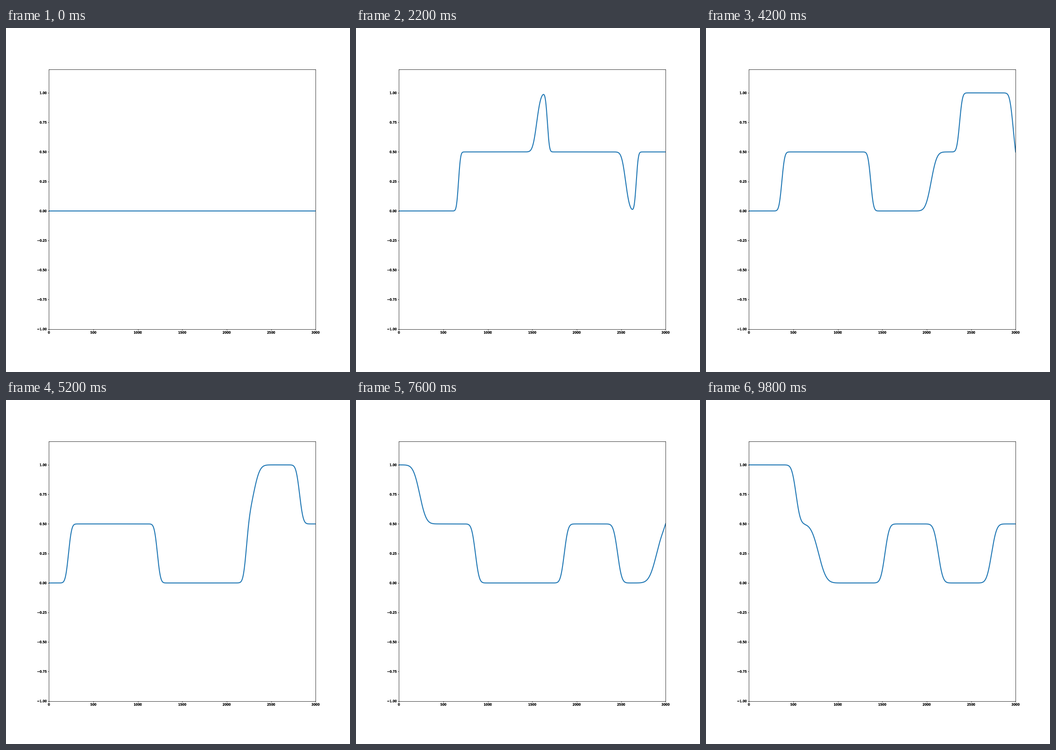
Recreate the animation shown at these times as a matplotlib script. Size 748x748 px, loop 10000 ms.

```python
import math

import matplotlib.pyplot as plt
import numpy as np
from matplotlib.animation import FuncAnimation
from matplotlib.patheffects import withStroke

SIZE = 748
FRAMES = 50
INTERVAL = 200
LENGTH = 3000

# Two travelling waves: cells per frame and spread (variance) per frame
LEFT_SPEED, LEFT_SPREAD = 30, 30
RIGHT_SPEED, RIGHT_SPREAD = 50, 120
BOX = (1000, 2000)

plt.rcParams["path.simplify_threshold"] = 0.077

erf = np.vectorize(math.erf)
x = np.arange(LENGTH + 1)


def edge(center, var):
    """Smooth rise from 0 to 0.5 around center."""
    return 0.25 * (1 + erf((x - center) / math.sqrt(2 * var)))


def right_edge(start, k, born=0, var=0):
    age = k - born
    return edge(start + RIGHT_SPEED * age, var + RIGHT_SPREAD * max(age, 0) + 1)


def left_edge(start, k, born=0, var=0):
    age = k - born
    return edge(start - LEFT_SPEED * age, var + LEFT_SPREAD * max(age, 0) + 1)


def wave(k):
    if k == 0:
        return np.zeros(len(x))
    a, b = BOX
    u = left_edge(a, k) - left_edge(b, k) + left_edge(LENGTH, k)
    u += right_edge(a, k) - right_edge(b, k)

    # Fixed value at the right end: reflection with flipped sign
    for start, sign in ((b, -1), (a, 1)):
        hit = (LENGTH - start) / RIGHT_SPEED
        var = RIGHT_SPREAD * hit * (LEFT_SPEED / RIGHT_SPEED) ** 2
        u += sign * left_edge(LENGTH, k, hit, var)

    # Free left end: reflection with the same sign
    hit = a / LEFT_SPEED
    var = LEFT_SPREAD * hit * (RIGHT_SPEED / LEFT_SPEED) ** 2
    return u + 0.5 - right_edge(0, k, hit, var)


fig = plt.figure(figsize=(15, 15), dpi=SIZE / 15, facecolor="white")
fig.subplots_adjust(left=0.1249, right=0.9, bottom=0.1249, top=0.88)
ax = fig.add_subplot()
ax.set_xlim(0, LENGTH)
ax.set_ylim(-1, 1.2)
ax.set_yticks(np.arange(-1, 1.01, 0.25))
ax.tick_params(width=1.2)
for spine in ax.spines.values():
    spine.set_linewidth(1.1)
for label in ax.get_xticklabels() + ax.get_yticklabels():
    label.set_path_effects([withStroke(linewidth=0.6, foreground="black")])
line, = ax.plot(x, np.zeros(len(x)), lw=3, color="#1f77b4")


def update(k):
    line.set_ydata(wave(k))
    return line,


anim = FuncAnimation(fig, update, frames=FRAMES, interval=INTERVAL,
                     repeat=True, repeat_delay=0)
plt.show()
```
